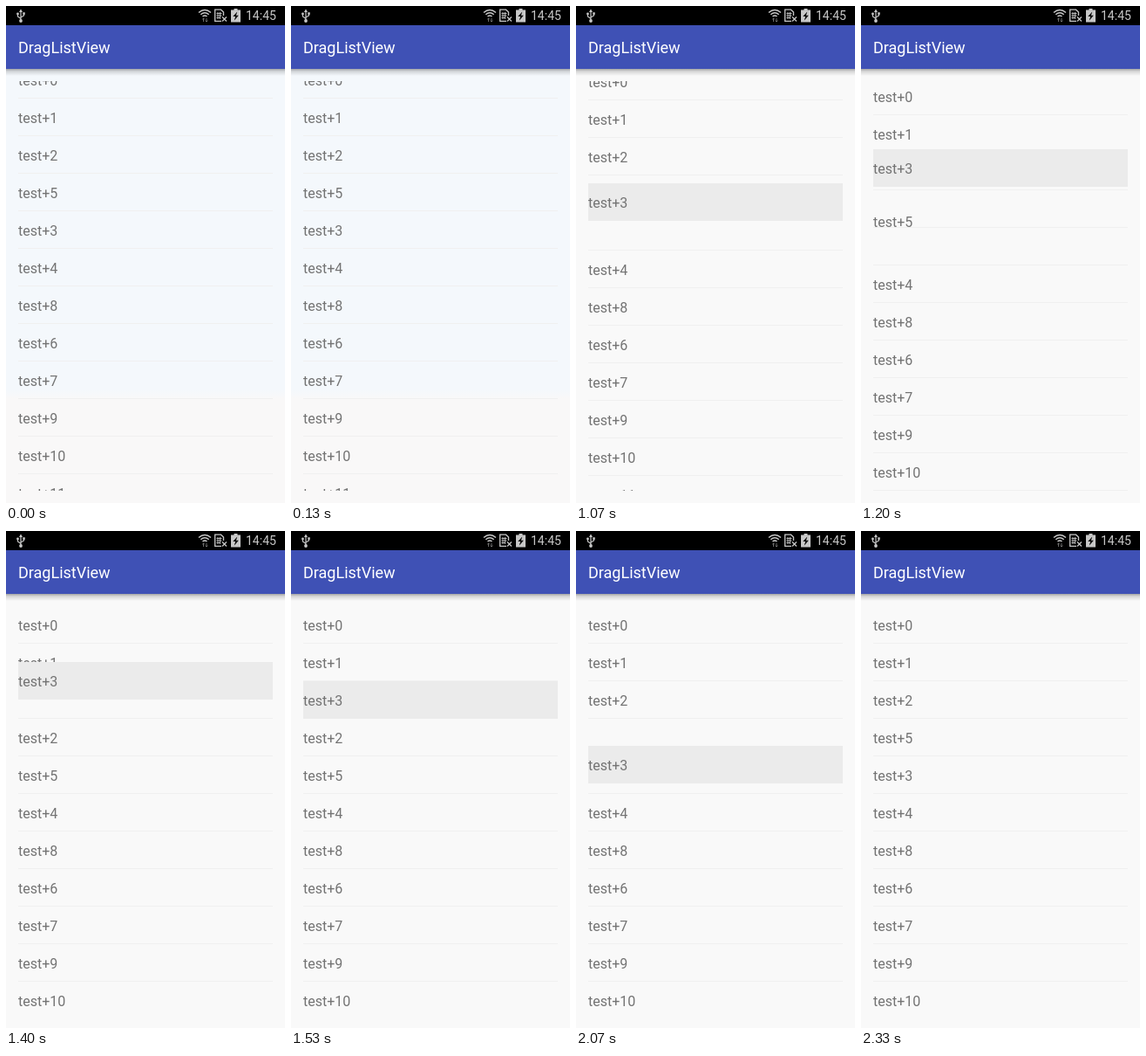
An HTML page that plays this animation: 320x569 px, repeating every 2390 ms.

```html
<!DOCTYPE html>
<html lang="en">
<head>
<meta charset="utf-8">
<title>Drag list</title>
<style>
  html, body { margin: 0; width: 100%; height: 100%; overflow: hidden; background: #f9f9f9; }
  svg { display: block; width: 100%; height: 100%; }
  text { font-family: Roboto, "Noto Sans", sans-serif; white-space: pre; }
  .row { font-size: 16px; fill: #737373; }
</style>
</head>
<body>
<svg viewBox="0 0 320 569">
  <defs>
    <clipPath id="viewport"><rect y="86" width="320" height="469"/></clipPath>
    <linearGradient id="shade" x2="0" y2="1">
      <stop offset="0" stop-color="#000" stop-opacity=".34"/>
      <stop offset=".35" stop-color="#000" stop-opacity=".14"/>
      <stop offset="1" stop-color="#000" stop-opacity="0"/>
    </linearGradient>
    <linearGradient id="cool" x2="0" y2="1">
      <stop offset="0" stop-color="#f4f8fc"/>
      <stop offset=".74" stop-color="#f4f8fc"/>
      <stop offset=".76" stop-color="#f9f8f8"/>
      <stop offset="1" stop-color="#f9f8f8"/>
    </linearGradient>
  </defs>

  <rect width="320" height="569" fill="#f9f9f9"/>
  <rect id="tint" y="72" width="320" height="497" fill="url(#cool)"/>
  <g clip-path="url(#viewport)"><g id="list"></g></g>
  <g id="drag">
    <rect x="14" y="-22" width="292" height="43" fill="#ebebeb"/>
    <text class="row" x="14" y="6">test+3</text>
  </g>

  <rect y="72" width="320" height="8" fill="url(#shade)"/>
  <rect y="22" width="320" height="50" fill="#3f51b5"/>
  <text x="14" y="54" font-size="18" fill="#fff">DragListView</text>

  <rect width="320" height="22" fill="#000"/>
  <g fill="none" stroke="#c8c8c8">
    <!-- usb -->
    <path d="M17 6V17M17 14.5L13.500 12V9.500M17 13L20.500 11V8.500" stroke-width="1.200"/>
    <g fill="#c8c8c8" stroke="none">
      <path d="M17 3.500L19 7H15Z"/>
      <circle cx="13.500" cy="9" r="1.400"/>
      <rect x="19.300" y="7.300" width="2.500" height="2.500"/>
      <circle cx="17" cy="17" r="1.900"/>
    </g>
    <!-- wifi -->
    <path d="M221 7.500Q228 1.500 235 7.500M223.300 9.800Q228 5.800 232.700 9.800M225.500 12Q228 10 230.500 12" stroke-width="1.500"/>
    <path d="M226.500 18V14M225.200 15.300L226.500 14L227.800 15.300M230 14V18M228.700 16.700L230 18L231.300 16.700" stroke="#888" stroke-width=".8"/>
    <!-- sim -->
    <path d="M247 17.300H239.700V4.200H246.500L249.500 7V11" stroke-width="1.300"/>
    <path d="M241.500 8.500H247.500M241.500 11H247.500M241.500 13.500H246M243 7V15M245.500 7V15" stroke-width=".9"/>
    <path d="M248 12.500L253 17.500M253 12.500L248 17.500" stroke-width="1.300"/>
    <!-- battery -->
    <path d="M261.500 3H265.500V4.500H269V18.500H258V4.500H261.500Z" fill="#c8c8c8" stroke="none"/>
    <path d="M265.300 6.500L260.300 12H263.200L261.700 16.800L266.800 10.800H263.900Z" fill="#000" stroke="none"/>
  </g>
  <text x="275" y="16" font-size="14" fill="#c8c8c8">14:45</text>
</svg>

<script>
const LOOP = 2390, ROW = 43, SWAP = 150;
const PICKED = 800, LIFTED = 870, DROPPED = 2330;
const ORDER = [0, 1, 2, 5, 3, 4, 8, 6, 7, 9, 10, 11];

// Moments at which the screen refreshes
const TICKS = [0, 800, 870, 930, 1000, 1070, 1130, 1200, 1270, 1330, 1400, 1470, 1530,
  1670, 1730, 1800, 1870, 1930, 2000, 2070, 2130, 2200, 2270, 2330];

// [time, value] paths
const SCROLL = [[0, -23], [1000, -23], [1070, -21], [1130, -13], [1200, -4], [1270, 0]];
const DRAG = [[870, 257], [930, 254], [1000, 243], [1070, 225], [1200, 186], [1270, 176],
  [1330, 171], [1400, 172], [1530, 194], [1670, 204], [1730, 221], [1800, 239],
  [1870, 252], [1930, 260], [2000, 266], [2130, 270]];
// Label -> slot moves made while the dragged row passes by
const SHIFTS = {
  2: [[1250, 2], [1250 + SWAP, 3], [1720, 3], [1720 + SWAP, 2]],
  5: [[1151, 3], [1151 + SWAP, 4], [2140, 4], [2140 + SWAP, 3]]
};

const byId = id => document.getElementById(id);
const list = byId("list"), drag = byId("drag"), tint = byId("tint");

function add(name, attrs) {
  const el = document.createElementNS("http://www.w3.org/2000/svg", name);
  for (const key in attrs) el.setAttribute(key, attrs[key]);
  return list.appendChild(el);
}

function along(path, t) {
  if (t <= path[0][0]) return path[0][1];
  for (let i = 1; i < path.length; i++) {
    const [t0, a] = path[i - 1], [t1, b] = path[i];
    if (t < t1) return a + (b - a) * (t - t0) / (t1 - t0);
  }
  return path[path.length - 1][1];
}

const moveTo = (el, y) => el.setAttribute("transform", `translate(0 ${Math.round(y)})`);
const show = (el, on) => el.setAttribute("visibility", on ? "visible" : "hidden");

ORDER.forEach((_, slot) =>
  add("rect", { x: 14, y: 128 + slot * ROW, width: 292, height: 1, fill: "#f0f0f0" }));

const rows = ORDER.map((label, slot) => {
  const el = add("text", { class: "row", x: 14, y: 114 });
  el.textContent = "test+" + label;
  return { el, label, slot };
});

function draw(t) {
  moveTo(list, along(SCROLL, t));
  for (const { el, label, slot } of rows) {
    const path = SHIFTS[label];
    moveTo(el, ROW * (path ? along(path, t) : slot));
    if (label === 3) show(el, t < PICKED || t >= DROPPED);
  }
  moveTo(drag, along(DRAG, t));
  show(drag, t >= LIFTED && t < DROPPED);
  show(tint, t < 1000);
}

const start = performance.now();
function frame() {
  const t = (performance.now() - start) % LOOP;
  draw(TICKS.filter(tick => tick <= t).pop() || 0);
  requestAnimationFrame(frame);
}
frame();
</script>
</body>
</html>
```
